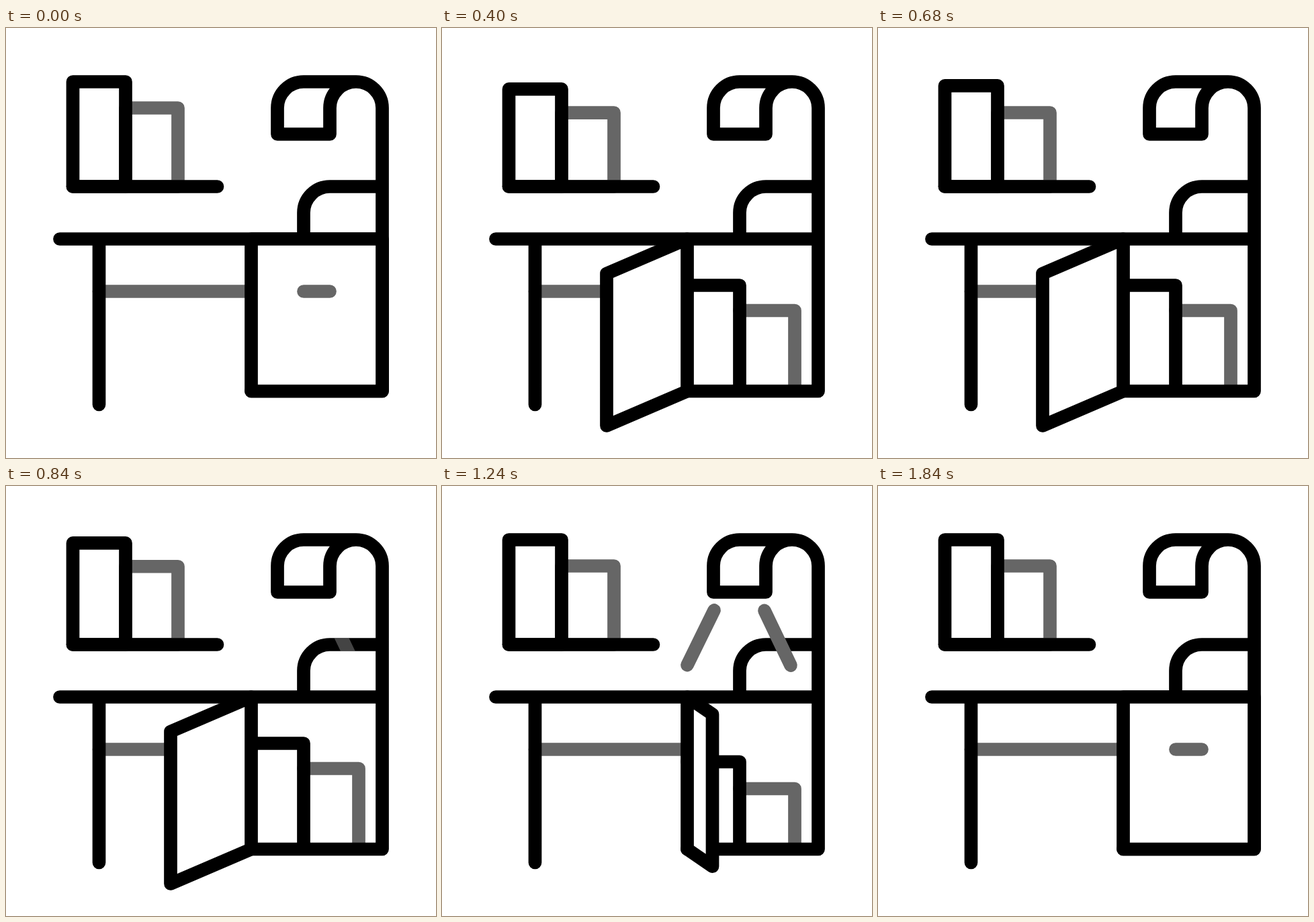
Animation, 640 px wide and 640 px high, one loop 2000 ms. Source, as an HTML page with a canvas:

```html
<!DOCTYPE html>
<html lang="en">
<head>
<meta charset="utf-8">
<title>Desk</title>
<style>
html, body { margin: 0; width: 100%; height: 100%; overflow: hidden; background: #fff; }
canvas { display: block; width: 640px; height: 640px; }
</style>
</head>
<body>
<canvas id="stage" width="640" height="640"></canvas>
<script>
const ctx = document.getElementById('stage').getContext('2d');
const LOOP = 2000, STEP = 40, LINE = 19.7;
const BLACK = '#000', GRAY = '#666';

const clamp = v => Math.max(0, Math.min(1, v));
const ramp = (t, a, b) => clamp((t - a) / (b - a));
const ease = u => u * u * (3 - 2 * u);
const mix = (a, b, u) => a + (b - a) * u;

// Eased value along [time, value] keys
function keyed(t, keys) {
  for (let i = 1; i < keys.length; i++) {
    const [t0, v0] = keys[i - 1], [t1, v1] = keys[i];
    if (t < t1) return mix(v0, v1, ease(ramp(t, t0, t1)));
  }
  return keys[keys.length - 1][1];
}

function stroke(path, color = BLACK, width = LINE) {
  ctx.strokeStyle = color;
  ctx.lineWidth = width;
  ctx.stroke(path);
}

function poly(points, close) {
  const path = new Path2D();
  points.forEach(([x, y]) => path.lineTo(x, y));
  if (close) path.closePath();
  return path;
}

const line = (points, color, width) => stroke(poly(points), color, width);

const frame = new Path2D(
  'M80 314H560 M138.5 314V560.5 M99.5 236H314.5 M365 540.5H560 ' +
  'M404 158V119A39 39 0 0 1 443 80H521A39 39 0 0 1 560 119V540.5 ' +
  'M404 158H482V119A39 39 0 0 1 521 80 ' +
  'M443 314V275A39 39 0 0 1 482 236H560');

// Crouch, leap, land and settle
function hop(t, height) {
  const u = (t - 560) / 90;
  return {
    lift: Math.abs(u) < 1 ? height * (1 - u * u) : 0,
    stretch: keyed(t, [[350, 0], [430, -16], [490, 9], [620, 9], [720, -14], [920, 0]])
  };
}

function book(left, right, top, motion, color) {
  const base = 236 - motion.lift;
  const head = top - motion.lift - motion.stretch;
  stroke(poly([[left, head], [right, head], [right, base], [left, base]], true), color);
}

function shelfBooks(t) {
  const back = hop(t + 40, 52);
  if (back.stretch < 0) back.stretch *= 0.5;
  book(178, 256, 119, back, GRAY);
  book(99.5, 178, 80, hop(t, 45), BLACK);
}

function cabinetBooks(open) {
  const back = 420.5 + 60 * (1 - open), front = 383 + 55 * (1 - open);
  line([[443, back], [525, back], [525, 540]], GRAY);
  line([[365, front], [443, front], [443, 540]]);
}

function door(t, open) {
  const x = mix(560, 245, open), dy = 51.5 * open;
  const panel = poly([[365, 314], [x, 314 + dy], [x, 540.5 + dy], [365, 540.5]], true);
  ctx.fillStyle = '#fff';
  ctx.fill(panel);
  stroke(panel);

  const size = t < 800 ? 1 - ramp(t, 120, 200) : ramp(t, 1360, 1440);
  if (size > 0) {
    const cx = mix(365, x, 0.5), half = 19.5 * size;
    const cy = 392 + dy / 2;
    line([[cx - half, cy], [cx + half, cy]], GRAY, LINE * size);
  }
}

function rays(t) {
  const glow = t < 1200 ? ramp(t, 680, 920) : 1 - ramp(t, 1600, 1840);
  if (glow <= 0) return;
  ctx.save();
  // A weak glow only shows against the dark arm
  if (glow < 0.75) {
    ctx.beginPath();
    ctx.rect(482, 226.2, 78, LINE);
    ctx.clip();
    ctx.globalAlpha = glow;
  }
  line([[405, 185], [365, 266.5]], GRAY);
  line([[480, 185.5], [519, 267]], GRAY);
  ctx.restore();
}

function draw(now) {
  const t = Math.floor((now % LOOP) / STEP) * STEP;
  const open = ease(ramp(t, 120, 360)) - ease(ramp(t, 1120, 1360));
  ctx.fillStyle = '#fff';
  ctx.fillRect(0, 0, 640, 640);
  ctx.lineCap = ctx.lineJoin = 'round';

  line([[138.5, 392], [365, 392]], GRAY);
  shelfBooks(t);
  if (open > 0) cabinetBooks(open);
  stroke(frame);
  door(t, open);
  rays(t);
}

const start = performance.now();
function tick() {
  draw(performance.now() - start);
  requestAnimationFrame(tick);
}
tick();
</script>
</body>
</html>
```
